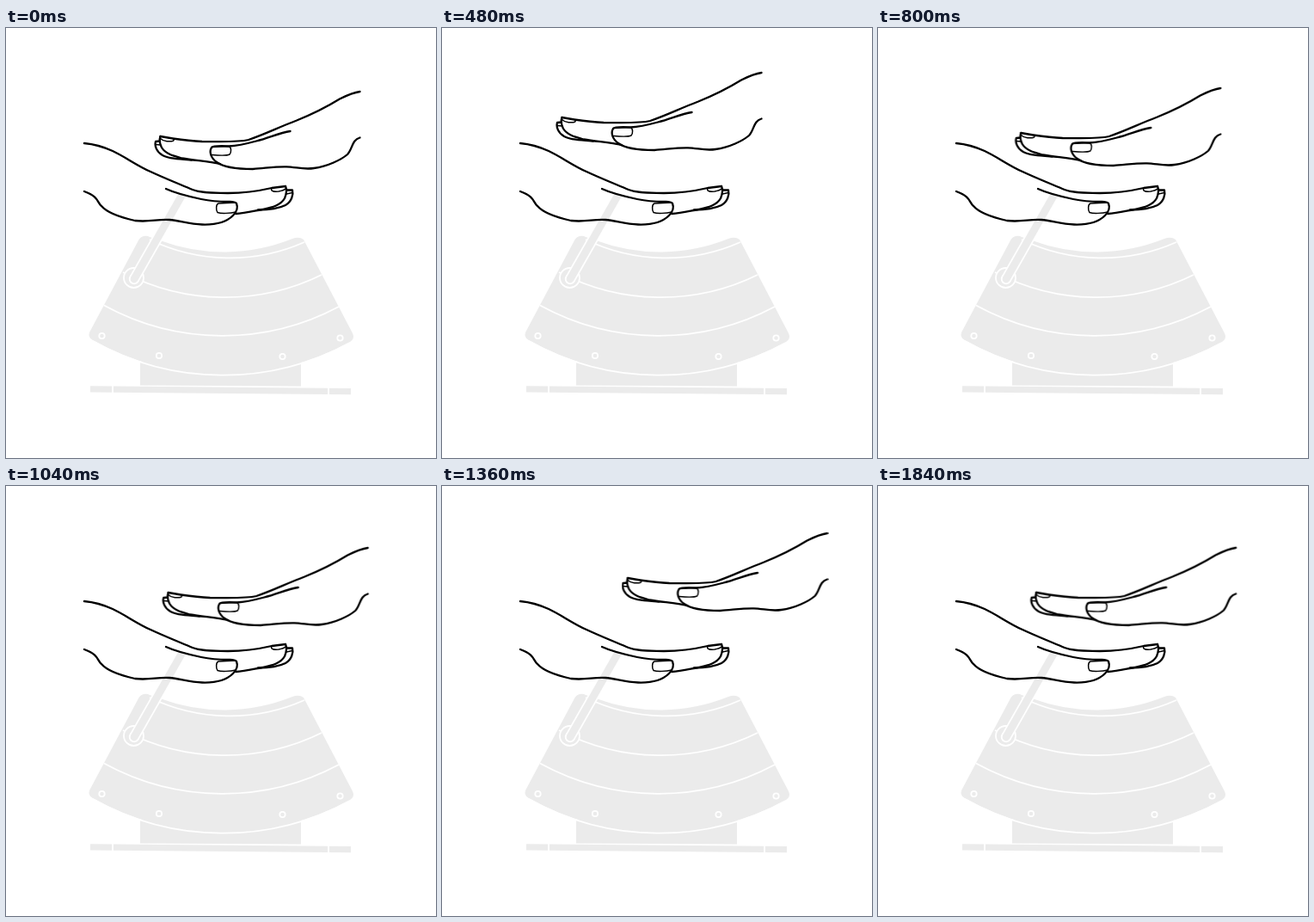
Recreate the animation shown at these times as an HTML page. Size 500 px wide and 500 px high, loop 1.92 s.

```html
<!DOCTYPE html>
<html lang="en">
<head>
<meta charset="utf-8">
<title>Hands over a fan</title>
<style>
  html, body { margin: 0; width: 100%; height: 100%; overflow: hidden; background: #fff; }
  svg { display: block; width: 100vw; height: 100vh; }
  .solid { fill: #ebebeb; }
  .gap { fill: none; stroke: #fff; stroke-width: 1.8; }
  .ink { fill: none; stroke: #000; stroke-width: 2.3; stroke-linecap: round; stroke-linejoin: round; }
  .thin { stroke-width: 1.5; }
</style>
</head>
<body>
<svg viewBox="0 0 500 500">
  <g id="fan">
    <path class="solid" d="M156 388H343V416.5L156 415.5Z"/>
    <path class="solid" d="M98 416.3L401 419V426.3L98 423.6Z"/>
    <path class="gap" d="M124 415V426M375 417V428"/>
    <path class="solid" d="M160 242Q164 241 167 243L179 247A213 213 0 0 0 333 245Q341 242 346 246L403 355Q406 361 400 365A308 308 0 0 1 101 363Q95 360 97 354L154 247Q156 243 160 242Z"/>
    <path class="gap" d="M400 366A308 308 0 0 1 101 364"/>
    <path class="gap" d="M167 246A214 214 0 0 0 347 249M136 284A255 255 0 0 0 367 287M114 322.5A287 287 0 0 0 387 324"/>
    <circle class="solid" cx="148.5" cy="290.5" r="11.5" style="stroke:#fff;stroke-width:1.8"/>
    <path d="M149 292L204.5 194.5" style="stroke:#fff;stroke-width:12.4"/>
    <circle cx="149" cy="292" r="6.2" fill="#fff"/>
    <path d="M149 292L204.5 194.5" style="stroke:#ebebeb;stroke-width:8.8"/>
    <circle class="solid" cx="149" cy="292" r="4.4"/>
  </g>
  <g class="ink">
    <path d="M91 134C102 135 113 138 124 143C139 150 152 160 168 167C185 175 203 182 217 188C227 192 240 191.5 258 192C279 192 296 189 309 186L325 184"/>
    <path d="M325 184C327 188 326 193 324 198C319 207 307 209 298 211C287 213 278 215.5 267 216"/>
    <path d="M327 188.500L333 188.500C334.500 194 332 202 325 206C317 210 306 211.500 293 211.500"/>
    <path d="M186 187C199 193 213 196 227 199C239 201.500 248 202 258 202Q266 201.500 268 204C270 209 268 214 264 218C256 226 243 229 228 228.500C213 228 202 224 190 223C176 222 167 226 150 224C132 220 117 214 111 207C106 203 108 196 91 190"/>
    <path class="thin" d="M309 186C307 190 312 190.500 317 190Q323 189 325 187M326 193L333 191.500"/>
    <path class="thin" d="M267 203L247 204C244 205 244 212 246 214.500C250 216 261 215.500 267 214"/>
  </g>
  <g class="ink" id="hand">
    <path d="M411.500 74C403 75 397 78 388 82.500C371 93 354 101 338 107.500C318 115 300 124 282 130C270 133 250 132 228 132C215 131.500 204 130 194 128.500L179.500 126"/>
    <path d="M179.500 126C178 130 179 135 181 139C186 147 196 149 205 151.500C219 154 235 155 249 158"/>
    <path d="M179 131.500L174 132C172.500 137 175 144 182 148C190 152 201 152.500 216 153.500"/>
    <path d="M330.500 120C317 122 306 128 291 131.500C278 135 268 137 259 137.500Q241 136.500 239 139C236 144 238 151 245 156C253 162 272 164 287 164C302 163 312 161 326 161.300C337 161.500 346 165 358 163C374 161 390 153 397 147C403 141 402 130 411.500 127.500"/>
    <path class="thin" d="M179.500 128.500Q182 131 187 131.700C193 132 196 132 195 128.700M174 135.500L180 136"/>
    <path class="thin" d="M239 138.500L259 137.500C262.500 139 262 144.500 260 147C256 149 245 148 239 147.500"/>
  </g>
</svg>
<script>
const NS = "http://www.w3.org/2000/svg";
const FRAMES = 24, STEP = 80;

// small rivets along the fan's outer edge
for (const [cx, cy] of [[111.5, 358], [178, 381], [321.5, 382], [388.5, 360.5]]) {
  const rivet = document.createElementNS(NS, "circle");
  Object.entries({ class: "gap", cx, cy, r: 3.2 }).forEach(([k, v]) => rivet.setAttribute(k, v));
  document.getElementById("fan").append(rivet);
}

// [step, x, y]: the hand swings left, dips, swings right and returns
const path = [
  [0, 0, 0], [6, -40, -22], [7, -33.3, -17], [10, -13.3, -4], [11, -6.2, -0.6],
  [12, 1.6, 0.2], [13, 9.2, -2.1], [14, 16.3, -6.4], [17, 36.5, -19],
  [21, 15.8, -8.2], [23, 4.6, -2.2], [24, 0, 0]
];

const keyframes = path.map(([step, x, y], i) => ({
  offset: step / FRAMES,
  transform: `translate(${x}px, ${y}px)`,
  easing: i < path.length - 1 ? `steps(${path[i + 1][0] - step}, end)` : "linear"
}));

document.getElementById("hand").animate(keyframes, { duration: FRAMES * STEP, iterations: Infinity });
</script>
</body>
</html>
```
